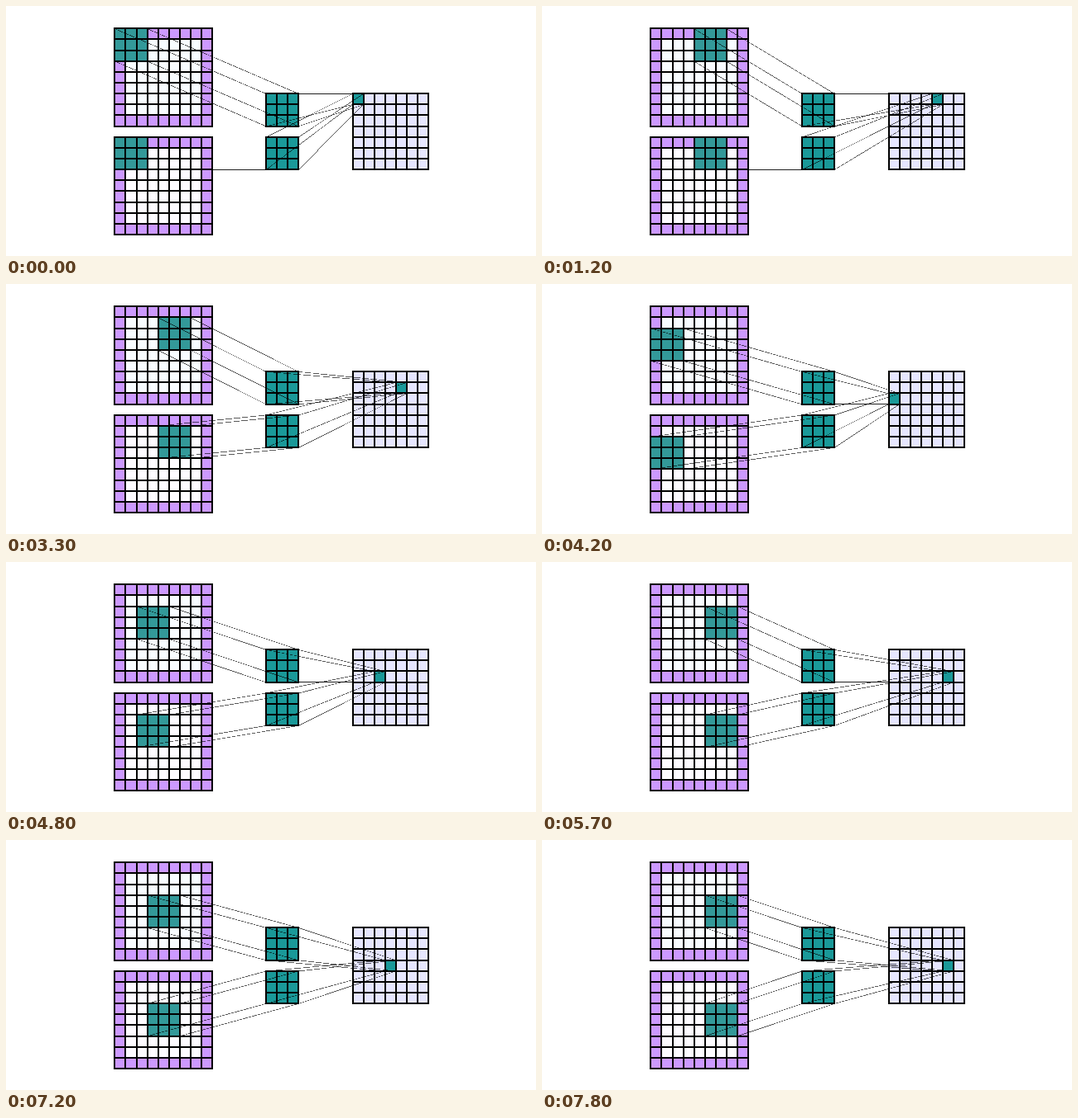
Write an HTML page with a canvas that moves like this. It is 640 by 303 pixels and loops after 8 s.

```html
<!DOCTYPE html>
<html lang="en">
<head>
<meta charset="utf-8">
<title>Convolution over two channels</title>
<style>
  html, body { margin: 0; width: 100%; height: 100%; overflow: hidden; background: #fff; }
  canvas { display: block; }
</style>
</head>
<body>
<canvas id="stage" width="640" height="303"></canvas>
<script>
const ctx = document.getElementById('stage').getContext('2d');
const LOOP = 8000, STEP = 300, COLS = 7;
const PURPLE = '#cc99ff', TEAL = '#1a9999', WINDOW = '#339999', LILAC = '#e6e6ff';

// Everything sits on one lattice, measured in cells.
const X = c => 131.25 + 13.06 * c;
const Y = r => 27.55 + 13.14 * r;
const snapX = c => Math.round(X(c) + 0.14);
const snapY = r => Math.round(Y(r) - 0.25);

const inputs = [{ row: 0, fill: '#f8fcff' }, { row: 10, fill: '#fdfbff' }];
const kernels = [{ col: 14, row: 6, size: 3 }, { col: 14, row: 10, size: 3 }];
const OUT = { col: 22, row: 6 };

function block(col, row, size, color) {
  const x = snapX(col), y = snapY(row);
  ctx.fillStyle = color;
  ctx.fillRect(x, y, snapX(col + size) - x, snapY(row + size) - y);
}

function grid(col, row, size) {
  const x = snapX(col) - 1, y = snapY(row) - 1;
  const w = snapX(col + size) + 1 - x, h = snapY(row + size) + 1 - y;
  ctx.fillStyle = '#000';
  for (let i = 0; i <= size; i++) {
    ctx.fillRect(snapX(col + i) - 1, y, 2, h);
    ctx.fillRect(x, snapY(row + i) - 1, w, 2);
  }
}

// Aliased thin line that drops out where it falls between two pixels.
function hairline(x0, y0, x1, y1) {
  const steep = Math.abs(y1 - y0) > Math.abs(x1 - x0);
  let [a0, b0, a1, b1] = steep ? [y0, x0, y1, x1] : [x0, y0, x1, y1];
  if (a0 > a1) [a0, b0, a1, b1] = [a1, b1, a0, b0];
  const slope = (b1 - b0) / (a1 - a0);
  const reach = 0.37 * Math.hypot(1, slope);
  for (let a = Math.floor(a0); a < a1; a++) {
    const b = b0 + (a + 0.5 - a0) * slope, cell = Math.floor(b);
    if (Math.abs(b - cell - 0.5) > reach) continue;
    if (steep) ctx.fillRect(cell, a, 1, 1);
    else ctx.fillRect(a, cell, 1, 1);
  }
}

// Joins matching corners of two squares.
function project(from, to) {
  ctx.fillStyle = 'rgba(0,0,0,0.65)';
  for (const i of [0, 1]) for (const j of [0, 1]) {
    hairline(X(from.col + i * from.size), Y(from.row + j * from.size),
             X(to.col + i * to.size), Y(to.row + j * to.size));
  }
}

function draw(time) {
  const n = Math.floor((time % LOOP) / STEP);
  const col = n % COLS, row = Math.floor(n / COLS);
  const cell = { col: OUT.col + col, row: OUT.row + row, size: 1 };

  ctx.fillStyle = '#fff';
  ctx.fillRect(0, 0, 640, 303);

  for (const input of inputs) {
    block(0, input.row, 9, PURPLE);
    block(1, input.row + 1, 7, input.fill);
    block(col, input.row + row, 3, WINDOW);
    grid(0, input.row, 9);
  }
  for (const k of kernels) {
    block(k.col, k.row, k.size, TEAL);
    grid(k.col, k.row, k.size);
  }
  block(OUT.col, OUT.row, COLS, LILAC);
  block(cell.col, cell.row, 1, TEAL);
  grid(OUT.col, OUT.row, COLS);

  kernels.forEach((k, i) => {
    project({ col, row: inputs[i].row + row, size: 3 }, k);
    project(k, cell);
  });
}

const start = performance.now();
function tick() {
  draw(performance.now() - start);
  requestAnimationFrame(tick);
}
tick();
</script>
</body>
</html>
```
